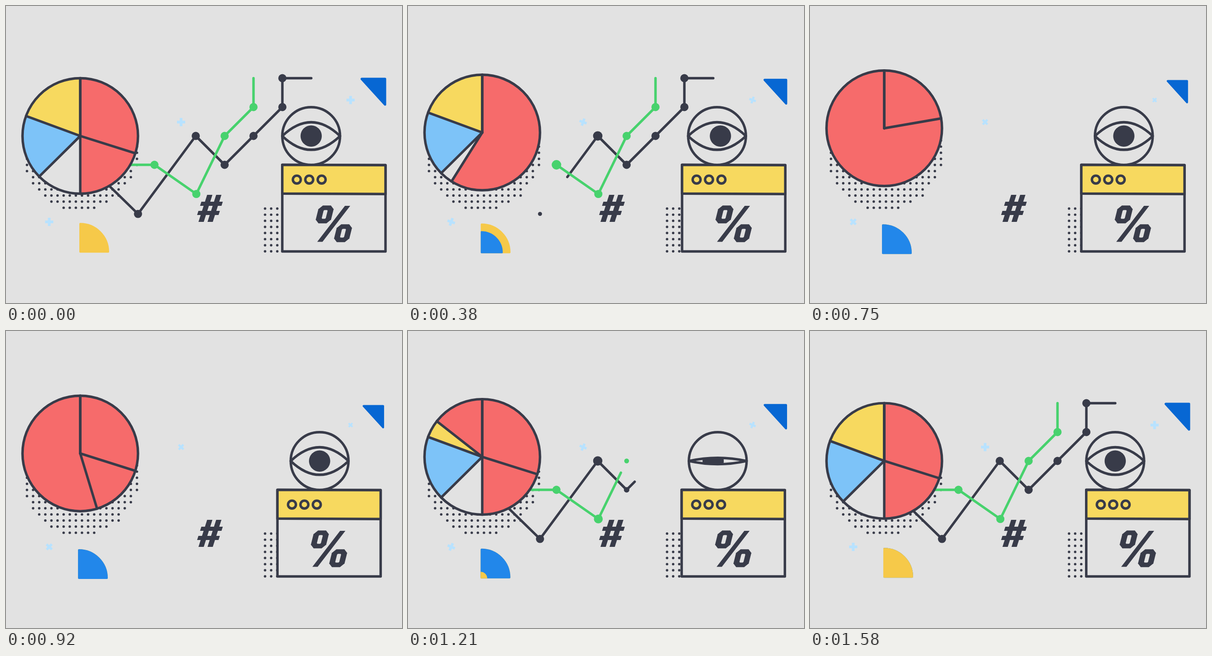
An HTML page with a canvas for the animation above (1.62 s loop, 864x648 px).

```html
<!DOCTYPE html>
<html lang="en">
<head>
<meta charset="utf-8">
<title>Charts</title>
<style>
  html, body { margin: 0; width: 100%; height: 100%; overflow: hidden; background: #e2e2e2; }
  canvas { display: block; }
</style>
</head>
<body>
<canvas id="stage" width="864" height="648"></canvas>
<script>
const ctx = document.getElementById('stage').getContext('2d');
const LOOP = 1620, STEP = 1000 / 24, LAST = 38, HALF = 19;
const UNIT = 63, LINE = 5.4, GAP = 13.33;
const BG = '#e2e2e2', INK = '#383b49', RED = '#f66b6b', YELLOW = '#f7d95f',
      SKY = '#7dc3f8', GREEN = '#47d26d', GOLD = '#f6c949', BLUE = '#2287ea',
      NAVY = '#0767d3', PALE = '#b8e2ff';

const clamp = (v, lo, hi) => Math.max(lo, Math.min(hi, v));

// Smooth 0 to 1, starting at step `start`.
function ramp(k, start, length) {
  const s = clamp((k - start) / length, 0, 1);
  return s * s * (3 - 2 * s);
}

function trace(points, close) {
  ctx.beginPath();
  points.forEach(([x, y]) => ctx.lineTo(x, y));
  if (close) ctx.closePath();
}

function fill(color) { ctx.fillStyle = color; ctx.fill(); }

function stroke(color, width = LINE) {
  ctx.strokeStyle = color;
  ctx.lineWidth = width;
  ctx.stroke();
}

function circle(x, y, r) {
  ctx.beginPath();
  ctx.arc(x, y, r, 0, Math.PI * 2);
}

function placed(x, y, paint, scale = 1) {
  ctx.save();
  ctx.translate(x, y);
  ctx.scale(scale, scale);
  paint();
  ctx.restore();
}

function dots() {
  const dot = (x, y) => { circle(x, y, 2.7); fill(INK); };
  for (let r = 0; r < 12; r++)
    for (let c = 0; c < 19; c++)
      if ((c - 8.65) ** 2 + (r - 1.8) ** 2 <= 92.4) dot(45.8 + c * GAP, 293.5 + r * GAP);
  for (let r = 0; r < 8; r++)
    for (let c = 0; c < 3; c++) dot(565.2 + c * GAP, 442 + r * GAP);
}

const onGrid = points => points.map(([a, b]) => [162 + a * UNIT, 157.5 + b * UNIT]);

// wipe/draw: start steps of the line; leave/enter: first node and stagger.
const GRAPHS = [
  {
    color: INK, speed: 72.7, wipe: 5.2, draw: 22.1, leave: [7.9, 1.45], enter: [25, 1.45],
    points: onGrid([[0, 2.75], [2, 4.7], [4, 2], [5, 3], [6, 2], [7, 1], [7, 0], [8, 0]])
  },
  {
    color: GREEN, speed: 54.7, wipe: 5.95, draw: 21.95, leave: [9, 2.35], enter: [24, 2],
    points: onGrid([[0, 3], [2.57, 3], [4.02, 4.01], [5, 2], [6, 1], [6, 0]])
  }
];

function graph(g, k) {
  const leaving = k < HALF;
  const total = g.points.slice(1).reduce((sum, [x, y], i) =>
    sum + Math.hypot(x - g.points[i][0], y - g.points[i][1]), 0);
  const from = leaving ? Math.max(0, g.speed * (k - g.wipe)) : 0;
  const to = leaving ? total : Math.min(total, g.speed * (k - g.draw));
  if (to > from) {
    ctx.setLineDash([to - from, 9999]);
    ctx.lineDashOffset = -from;
    trace(g.points);
    stroke(g.color);
    ctx.setLineDash([]);
  }
  const [first, stagger] = leaving ? g.leave : g.enter;
  g.points.slice(1, -1).forEach(([x, y], i) => {
    const t = k - first - i * stagger;
    const s = leaving
      ? 1 + 0.17 * ramp(t, -2, 2) - 1.17 * ramp(t, 0, 2)
      : 1.17 * ramp(t, 0, 2) - 0.17 * ramp(t, 2, 2);
    circle(x, y, 8.9 * Math.max(0, s));
    fill(g.color);
  });
}

const EDGES = [0, 107.5, 180, 225.3, 290.2, 360];
const COLORS = [RED, RED, BG, SKY, YELLOW];

function pie(k, swing) {
  const R = 2 * UNIT, rad = deg => (deg - 90) * Math.PI / 180;
  const wedge = (a, b, color) => {
    ctx.beginPath();
    ctx.moveTo(0, 0);
    ctx.arc(0, 0, R, rad(a), rad(b));
    fill(color);
  };
  const slices = limit => COLORS.forEach((color, i) => {
    if (limit > EDGES[i]) wedge(EDGES[i], Math.min(limit, EDGES[i + 1]), color);
  });
  // Red covers the old slices, then the new ones are swept in.
  const cover = clamp(107.5 + 19.2 * (k - 3.55), 107.5, 360);
  const sweep = clamp(20.72 * (k - 14.13), 0, 360);

  placed(162, 275 + 8.5 * swing, () => {
    slices(360);
    wedge(0, cover, RED);
    slices(sweep);
    [cover, sweep, ...EDGES.filter(a => a > cover || a < sweep)].forEach(a => {
      trace([[0, 0], [R * Math.cos(rad(a)), R * Math.sin(rad(a))]]);
      stroke(INK);
    });
    circle(0, 0, R);
    stroke(INK);
  });
}

function eye(k, swing) {
  const lid = middle => ramp(Math.abs(k - middle), 0, 3.2);
  const bend = 60 * lid(12.3) * lid(30);
  const look = 10 * (ramp(k, 5, 6) - ramp(k, 11, 2) - ramp(k, 22, 6) + ramp(k, 29.5, 2.5));
  placed(675.4 - 9.6 * swing, 283.7, () => {
    circle(0, 0, UNIT);
    stroke(INK);
    const lens = new Path2D(`M-63 0Q0 ${-bend} 63 0Q0 ${bend} -63 0Z`);
    ctx.save();
    ctx.clip(lens);
    circle(look, 0, 23.2);
    fill(INK);
    ctx.restore();
    ctx.lineWidth = LINE;
    ctx.stroke(lens);
  });
}

function octagon(w, h, cut, color) {
  trace([[cut - w, -h], [w - cut, -h], [w, cut - h], [w, h - cut],
         [w - cut, h], [cut - w, h], [-w, h - cut], [-w, cut - h]], true);
  fill(color);
}

function percent() {
  trace([[24.2, -39.3], [35.7, -39.3], [-24.8, 39.2], [-36.3, 39.2]], true);
  fill(INK);
  [-1, 1].forEach(side => placed(20 * side, 20.5 * side, () => {
    ctx.transform(1, 0, -0.25, 1, 0, 0);
    octagon(16.7, 19.5, 8, INK);
    octagon(4.4, 9.5, 1.5, BG);
  }));
}

function hash() {
  placed(445, 441.5, () => {
    ctx.transform(1, 0, -0.32, 1, 0, 0);
    ctx.fillStyle = INK;
    [-1, 1].forEach(side => {
      ctx.fillRect(9.85 * side - 5.75, -29.5, 11.5, 59);
      ctx.fillRect(-23.4, 10 * side - 4.5, 46.8, 9);
    });
  });
}

function panel(swing) {
  const W = 225.2;
  const box = (left, right, color) => {
    trace([[0, 0], [W, 0.8], [W, right], [0, left]], true);
    fill(color);
    stroke(INK);
  };
  placed(597.3 + 5.5 * swing, 346.5, () => {
    box(189, 189, BG);
    box(62.8, 63.8, YELLOW);
    for (let i = 0; i < 3; i++) { circle(31.7 + 27.1 * i, 32.2, 8.6); stroke(INK); }
    placed(112.5, 128.8, percent);
  });
}

function quarter(k, swing) {
  const shape = (scale, color) => {
    if (scale > 0) placed(0, 0, () => {
      ctx.beginPath();
      ctx.moveTo(2, -2);
      ctx.arc(2, -2, 61, -Math.PI / 2, 0);
      ctx.closePath();
      fill(color);
      stroke(color, 4);
    }, scale);
  };
  placed(158.5 + 1.5 * swing, 539.7 - 1.5 * swing, () => {
    shape(1, GOLD);
    shape(ramp(k, 2, 10.5), BLUE);
    shape(ramp(k, 25.8, 10.5), GOLD);
  });
}

function triangle(swing) {
  placed(801.5, 187, () => {
    trace([[-25.5, -28], [25.5, -28], [25.5, 28]], true);
    fill(NAVY);
    stroke(NAVY, 5);
  }, 0.915 + 0.085 * swing);
}

// Each plus has its own smallest scale.
const PLUSES = [[94.3, 471, 0.9], [382, 253.3, 0.8], [751.8, 205.2, 0.62]];

function pluses(swing) {
  const turn = (1 - swing) / 2;
  PLUSES.forEach(([x, y, least]) => placed(x, y, () => {
    ctx.rotate(turn * Math.PI / 4);
    ctx.fillStyle = PALE;
    ctx.fillRect(-9, -3, 18, 6);
    ctx.fillRect(-3, -9, 6, 18);
  }, 1 - (1 - least) * turn));
}

function draw(now) {
  const k = Math.min(LAST, Math.floor((now % LOOP + 4.9) / STEP));
  const swing = Math.cos(2 * Math.PI * k / (LAST + 1));
  ctx.lineCap = ctx.lineJoin = 'round';
  ctx.fillStyle = BG;
  ctx.fillRect(0, 0, 864, 648);
  dots();
  pluses(swing);
  GRAPHS.forEach(g => graph(g, k));
  pie(k, swing);
  quarter(k, swing);
  hash();
  eye(k, swing);
  panel(swing);
  triangle(swing);
}

function tick(now) {
  draw(now);
  requestAnimationFrame(tick);
}
draw(0);
requestAnimationFrame(tick);
</script>
</body>
</html>
```
